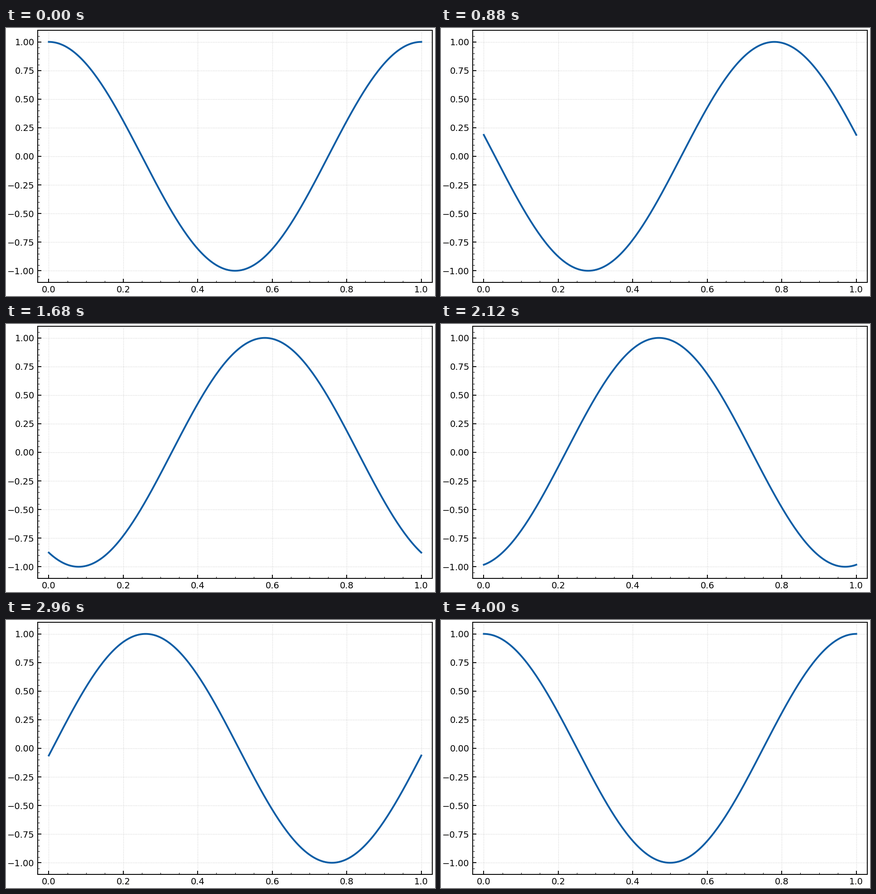
A matplotlib script for the animation above (4040 ms loop, 947x591 px).

```python
import numpy as np
import matplotlib.pyplot as plt
from matplotlib.animation import FuncAnimation
from matplotlib.ticker import AutoMinorLocator, MultipleLocator

W, H, DPI = 947, 591, 200
FRAMES, INTERVAL = 101, 40
LEFT, RIGHT, TOP, BOTTOM = 69.8, 941.4, 5.4, 560.6

plt.rcParams.update({
    "font.family": "DejaVu Sans",
    "font.size": 7,
    "axes.linewidth": 0.7,
    "axes.axisbelow": True,
})

fig = plt.figure(figsize=(W / DPI, H / DPI), dpi=DPI, facecolor="white")
ax = fig.add_axes([LEFT / W, 1 - BOTTOM / H, (RIGHT - LEFT) / W, (BOTTOM - TOP) / H])
ax.set(xlim=(-0.03, 1.03), ylim=(-1.1, 1.1))

for axis, step, parts in ((ax.xaxis, 0.2, 4), (ax.yaxis, 0.25, 5)):
    axis.set_major_locator(MultipleLocator(step))
    axis.set_minor_locator(AutoMinorLocator(parts))
ax.tick_params(which="major", direction="in", length=3, width=0.7, pad=2.5, labelsize=7)
ax.tick_params(which="minor", direction="in", length=1.5, width=0.4)
ax.grid(True, which="major", linestyle=":", linewidth=0.5, color="#b0b0b0", alpha=0.6)

x = np.linspace(0, 1, 200)
wave, = ax.plot(x, np.cos(2 * np.pi * x), color="#0C5DA5", linewidth=1.4)


def update(i):
    """Slide the wave left by one full period over the loop."""
    phase = i / (FRAMES - 1)
    wave.set_ydata(np.cos(2 * np.pi * (x + phase)))
    return wave,


anim = FuncAnimation(fig, update, frames=FRAMES, interval=INTERVAL, repeat=True, repeat_delay=0)
plt.show()
```
